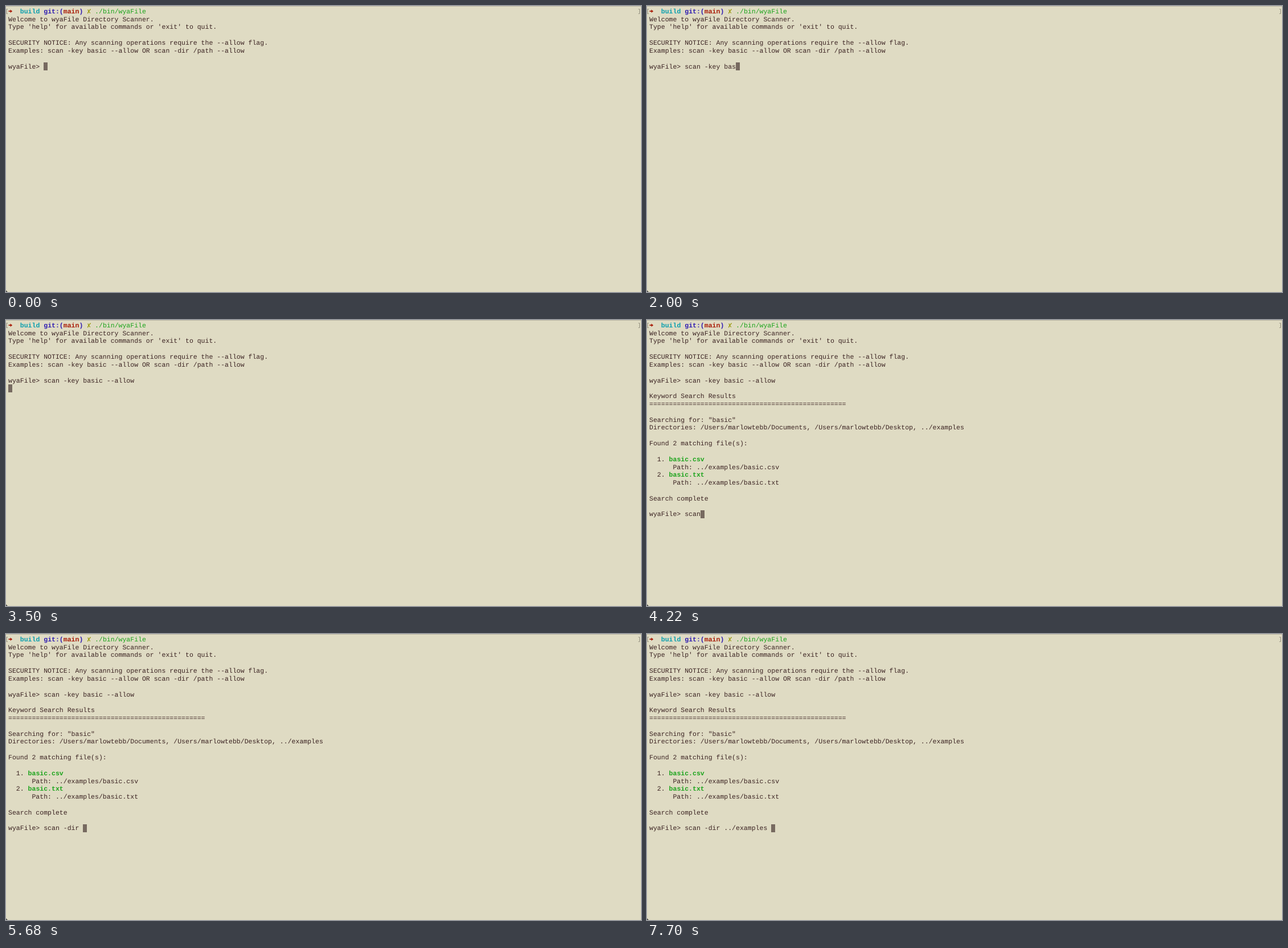
Write an HTML page with a canvas that moves like this. It is 1115x502 px and loops after 8000 ms.

```html
<!DOCTYPE html>
<html lang="en">
<head>
<meta charset="utf-8">
<title>Directory scanner session</title>
<style>
  html, body { margin: 0; width: 100%; height: 100%; overflow: hidden; background: #dfdbc3; }
  canvas { display: block; }
</style>
</head>
<body>
<canvas id="stage" width="1115" height="502"></canvas>
<script>
const ctx = document.getElementById('stage').getContext('2d');
const LOOP = 8000;
const CELL = 6.913, ROW = 13.82, LEFT = 4, TOP = 2;
const FONT = "11.52px 'Liberation Mono', 'Courier New', monospace";
const INK = '#3b2322', GREEN = '#1ca41c', RED = '#a91c08', CYAN = '#0a9fae', BLUE = '#2e1bb2';
const ENTER = 3500, OUTPUT = 3520;
const PROMPT = 'wyaFile> ';

const firstCommand = {
  text: 'scan -key basic --allow',
  keys: [620, 780, 860, 920, 1060, 1180, 1400, 1580, 1660, 1740, 1840, 1920, 2000,
         2120, 2220, 2300, 2600, 2720, 2920, 3040, 3140, 3280, 3420]
};
const secondCommand = {
  text: 'scan -dir ../examples ',
  keys: [3920, 4080, 4160, 4220, 4360, 4840, 4960, 5200, 5360, 5420, 5760, 5820,
         6020, 6160, 6340, 6500, 6640, 6820, 6900, 7000, 7100, 7220]
};

const intro = [
  [1, 'Welcome to wyaFile Directory Scanner.'],
  [2, "Type 'help' for available commands or 'exit' to quit."],
  [4, 'SECURITY NOTICE: Any scanning operations require the --allow flag.'],
  [5, 'Examples: scan -key basic --allow OR scan -dir /path --allow']
];
const results = [
  [9, 'Keyword Search Results'],
  [10, '='.repeat(50)],
  [12, 'Searching for: "basic"'],
  [13, 'Directories: /Users/marlowtebb/Documents, /Users/marlowtebb/Desktop, ../examples'],
  [15, 'Found 2 matching file(s):'],
  [17, '  1. '],
  [18, '      Path: ../examples/basic.csv'],
  [19, '  2. '],
  [20, '      Path: ../examples/basic.txt'],
  [22, 'Search complete']
];

const columnX = col => LEFT + col * CELL;

function write(row, col, text, color = INK, bold = false) {
  ctx.font = (bold ? 'bold ' : '') + FONT;
  ctx.fillStyle = color;
  ctx.fillText(text, columnX(col), Math.round(TOP + row * ROW + 10.8));
}

function drawCursor(row, col) {
  ctx.fillStyle = '#776a60';
  ctx.fillRect(Math.round(columnX(col)), Math.round(TOP + row * ROW), 7, 14);
}

function typed({ text, keys }, t) {
  return text.slice(0, keys.filter(key => key <= t).length);
}

function drawPrompt(row, command, t, active) {
  const line = PROMPT + typed(command, t);
  write(row, 0, line);
  if (active) drawCursor(row, line.length);
}

function drawBracket(x, turn) {
  ctx.strokeStyle = '#928d7d';
  ctx.lineWidth = 1;
  ctx.beginPath();
  ctx.moveTo(x + 2 * turn, 5.5);
  ctx.lineTo(x, 5.5);
  ctx.lineTo(x, 13.5);
  ctx.lineTo(x + 2 * turn, 13.5);
  ctx.stroke();
}

function drawArrow() {
  ctx.fillStyle = RED;
  ctx.fillRect(4.5, 8.3, 4, 1.7);
  ctx.beginPath();
  ctx.moveTo(7.5, 6.2);
  ctx.lineTo(11.2, 9.15);
  ctx.lineTo(7.5, 12.1);
  ctx.fill();
}

function drawCross() {
  ctx.strokeStyle = '#99990a';
  ctx.lineWidth = 1.3;
  ctx.beginPath();
  ctx.moveTo(143.3, 13.2);
  ctx.quadraticCurveTo(145.2, 8.6, 148.6, 5.6);
  ctx.moveTo(143.8, 6.2);
  ctx.quadraticCurveTo(145.6, 10.4, 147.8, 12.6);
  ctx.stroke();
}

function drawShellLine() {
  drawBracket(1, 1);
  drawBracket(1112.5, -1);
  drawArrow();
  write(0, 3, 'build', CYAN, true);
  write(0, 9, 'git:(', BLUE, true);
  write(0, 14, 'main', RED, true);
  write(0, 18, ')', BLUE, true);
  drawCross();
  write(0, 22, './bin/wyaFile', GREEN);
}

function drawWindow() {
  ctx.fillStyle = '#dfdbc3';
  ctx.fillRect(0, 0, 1115, 502);
  ctx.fillStyle = '#b9b5a2';
  ctx.fillRect(0, 0, 1115, 1);
  ctx.fillStyle = '#4a4a48';
  ctx.beginPath();
  ctx.moveTo(0, 499);
  ctx.lineTo(3, 502);
  ctx.lineTo(0, 502);
  ctx.fill();
}

function draw(t) {
  drawWindow();
  drawShellLine();
  intro.forEach(([row, text]) => write(row, 0, text));
  drawPrompt(7, firstCommand, t, t < ENTER);
  if (t >= OUTPUT) {
    results.forEach(([row, text]) => write(row, 0, text));
    write(17, 5, 'basic.csv', GREEN, true);
    write(19, 5, 'basic.txt', GREEN, true);
    drawPrompt(24, secondCommand, t, true);
  } else if (t >= ENTER) {
    drawCursor(8, 0);
  }
}

ctx.textRendering = 'geometricPrecision';
const start = performance.now();
function tick() {
  draw((performance.now() - start) % LOOP);
  requestAnimationFrame(tick);
}
tick();
</script>
</body>
</html>
```
